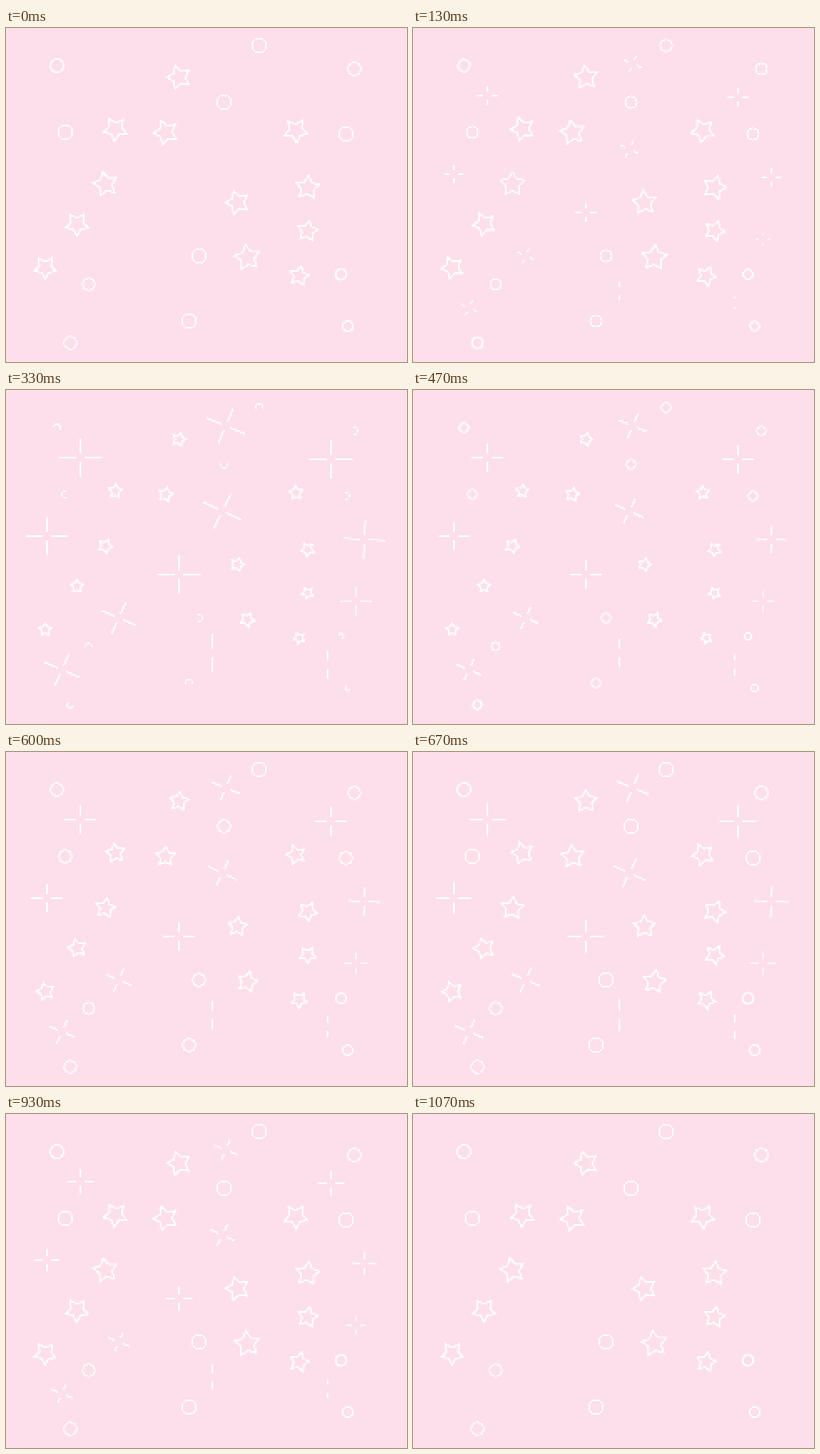
An HTML page with a canvas for the animation above (1.19 s loop, 480x400 px).

```html
<!DOCTYPE html>
<html lang="en">
<head>
<meta charset="utf-8">
<title>Twinkling stars</title>
<style>
  html, body { margin: 0; width: 100%; height: 100%; overflow: hidden; background: #fcdfea; }
  canvas { display: block; width: 480px; height: 400px; image-rendering: pixelated; }
</style>
</head>
<body>
<canvas id="sky" width="240" height="200"></canvas>
<script>
const ctx = document.getElementById('sky').getContext('2d', { willReadFrequently: true });
const LOOP = 1190, LAST = 16, RAD = Math.PI / 180;

// x, y, radius, direction of the part that stays visible when small
const rings = [
  [60, 45, 8.5, -60], [303, 21, 9, -90], [417, 48, 8.5, 0], [260, 88, 8.7, 90],
  [71, 124, 8.7, 180], [406, 127, 8.7, 0], [230, 272, 8.7, 0], [98, 307, 8, -90],
  [400, 294, 7, -40], [219, 351, 8.7, -90], [408, 357, 6.7, 150], [77, 376, 8, 120]
];
// x, y, radius, tilt
const stars = [
  [207, 59, 15, -18], [130, 120, 15, 40], [190, 125, 15.5, -22], [347, 123, 15, 32],
  [118, 187, 15.5, -12], [360, 191, 15, 5], [277, 208, 15, -18], [84, 235, 14.5, 36],
  [361, 242, 13, 10], [289, 275, 16, -9], [47, 287, 14, 36], [351, 296, 12.5, 12]
];
// x, y, scale, tilt, opacity, opacity of the level arms
const sparks = [
  [88, 80, 1, 0, 1, 1], [389, 83, 1, 0, 1, 1], [48, 175, .95, 0, 1, 1],
  [428, 178, .98, 3, 1, 1], [207, 221, 1, 0, 1, 1], [418, 252, .74, 0, .6, .6],
  [247, 314, 1, 0, 1, 0], [385, 328, .75, 0, .75, 0],
  [263, 42, .96, 23, 1, 1], [258, 144, 1, 26, 1, 1],
  [135, 272, .87, 24, 1, 1], [67, 335, .87, 24, 1, 1]
];

// [step, value] pairs
const ringSize = [[0, 1], [3, .82], [5, .53], [6, .53], [7, .7], [9, .95], [10, 1], [16, 1]];
const starSize = [[0, 1], [2, 1], [3, .94], [5, .6], [7, .58], [10, .93], [12, 1], [16, 1]];
const starTurn = [[0, 0], [3, 18], [5, 36], [7, 36], [10, 17], [12, 4], [16, 0]];
const sparkReach = [[0, 0], [3, 18.5], [5, 26], [7, 19], [8, 17], [10, 22], [12, 26], [14, 16], [16, 0]];

function at(keys, n) {
  const i = Math.max(1, keys.findIndex(k => k[0] >= n));
  const [a, u] = keys[i - 1], [b, v] = keys[i];
  return u + (v - u) * (n - a) / (b - a);
}

function place(x, y, tilt, paint) {
  ctx.save();
  ctx.translate(Math.floor(x / 2) + .5, Math.floor(y / 2) + .5);
  ctx.rotate(tilt * RAD);
  ctx.scale(.5, .5);
  ctx.beginPath();
  paint();
  ctx.stroke();
  ctx.restore();
}

function drawRing([x, y, r, dir], size) {
  const half = size < .6 ? 115 * RAD : Math.PI;
  place(x, y, dir, () => ctx.arc(0, 0, r * size - .5, -half, half));
}

function drawStar([x, y, r, tilt], size, turn) {
  place(x, y, tilt + turn, () => {
    for (let i = 0; i < 10; i++) {
      const d = (r * size - .3) * (i % 2 ? .52 : 1), a = i * 36 * RAD;
      ctx.lineTo(d * Math.sin(a), -d * Math.cos(a));
    }
    ctx.closePath();
  });
}

function drawSpark([x, y, scale, tilt, alpha, level], reach) {
  const far = reach * scale, gap = 5;
  const arms = (dx, dy, end) => {
    if (end <= gap) return;
    for (const s of [-1, 1]) {
      ctx.moveTo(s * dx * gap, s * dy * gap);
      ctx.lineTo(s * dx * end, s * dy * end);
    }
  };
  ctx.globalAlpha = alpha;
  place(x, y, tilt, () => arms(0, 1, far * .9));
  ctx.globalAlpha = level;
  if (level) place(x, y, tilt * .96, () => arms(1, 0, far));
  ctx.globalAlpha = 1;
}

// Harden the soft edges for a pixel look
function sharpen() {
  const img = ctx.getImageData(0, 0, 240, 200), d = img.data;
  for (let i = 3; i < d.length; i += 4) {
    if (!d[i]) continue;
    d[i - 3] = d[i - 2] = d[i - 1] = 255;
    d[i] = (d[i] - 65) * 1.9;
  }
  ctx.putImageData(img, 0, 0);
}

function draw(n) {
  ctx.clearRect(0, 0, 240, 200);
  ctx.strokeStyle = '#fff';
  ctx.lineWidth = 2;
  rings.forEach(r => drawRing(r, at(ringSize, n)));
  stars.forEach(s => drawStar(s, at(starSize, n), at(starTurn, n)));
  sparks.forEach(s => drawSpark(s, at(sparkReach, n)));
  sharpen();
}

// Fifteen steps a second, starting on whole hundredths
function stepAt(t) {
  const n = Math.floor((t + 4) * 3 / 200);
  return Math.min(LAST, Math.round(n * 20 / 3) * 10 > t ? n - 1 : n);
}

let shown = -1;
function tick() {
  const n = stepAt(performance.now() % LOOP);
  if (n !== shown) draw(shown = n);
  requestAnimationFrame(tick);
}
tick();
</script>
</body>
</html>
```
